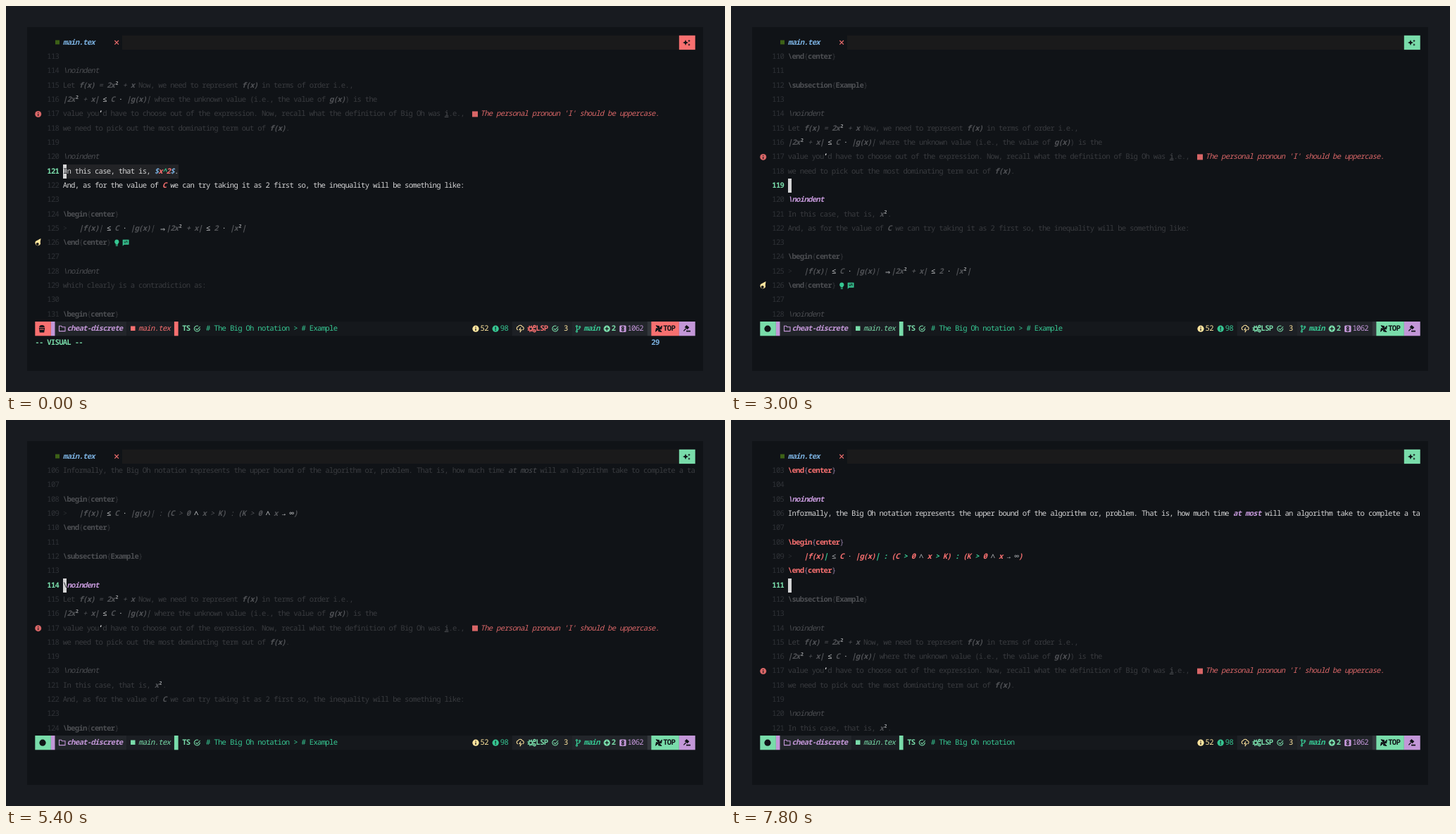
Animation, 1021 px wide and 548 px high, one loop 8000 ms. Source, as an HTML page:

```html
<!DOCTYPE html>
<html lang="en">
<head>
<meta charset="utf-8">
<title>Editor session</title>
<style>
  html, body { margin: 0; width: 100%; height: 100%; overflow: hidden; background: #181b20; }
  #stage { position: absolute; left: 0; top: 0; width: 1021px; height: 548px; overflow: hidden;
    --mode: #f87070; --tab: #f87070; }
  svg, #fixed, #rows { position: absolute; left: 0; top: 0; }
  #rows { width: 978.6px; height: 548px; overflow: hidden; }
  span, b { position: absolute; white-space: pre; font: 400 10.6px/20.31px "Noto Sans Mono", "DejaVu Sans Mono", monospace;
    letter-spacing: var(--gap); font-variant-ligatures: none; text-rendering: geometricPrecision; }
  b { height: 20.31px; }
  .line { fill: none; stroke-width: 1.1; }
</style>
</head>
<body>
<div id="stage">
  <svg width="1021" height="548" viewBox="0 0 1021 548">
    <rect x="30" y="30" width="960" height="488" fill="#101317"/>
    <!-- tab bar -->
    <rect x="165" y="41.8" width="791" height="20.3" fill="#1a1a1b"/>
    <rect x="955.8" y="41.8" width="22.9" height="20.3" fill="var(--tab)"/>
    <path d="M965 48l1.2 2.8 2.8 1.2-2.8 1.2L965 56l-1.2-2.8L961 52l2.8-1.2zM970 47.500l.6 1.400 1.400.6-1.400.6-.6 1.400-.6-1.400-1.400-.6 1.400-.6zM970 53l.6 1.400 1.400.6-1.400.6-.6 1.400-.6-1.400-1.400-.6 1.400-.6z" fill="#101317"/>
    <rect x="70" y="48.500" width="6" height="6" fill="#3d6117"/>
    <path class="line" d="M154.300 49l5.600 5.600m0-5.600l-5.600 5.600" stroke="#f87070"/>
    <!-- status bar -->
    <rect x="41.300" y="448" width="937.300" height="20.300" fill="#15181c"/>
    <rect x="69.500" y="448" width="101.600" height="20.300" fill="#22252a"/>
    <rect x="171.100" y="448" width="67.800" height="20.300" fill="#1b1e23"/>
    <rect x="718.700" y="448" width="84.700" height="20.300" fill="#1d2025"/>
    <rect x="803.400" y="448" width="107.200" height="20.300" fill="#22252a"/>
    <rect x="910.600" y="448" width="5.700" height="20.300" fill="#33373c"/>
    <g fill="var(--mode)">
      <rect x="41.300" y="448" width="22.600" height="20.300"/>
      <rect x="238.900" y="448" width="5.700" height="20.300"/>
      <rect x="916.300" y="448" width="39.600" height="20.300"/>
      <rect x="177" y="454.500" width="6.500" height="6.500"/>
    </g>
    <g fill="#c397d8">
      <rect x="63.900" y="448" width="5.600" height="20.300"/>
      <rect x="955.800" y="448" width="22.900" height="20.300"/>
      <rect x="871.200" y="453.500" width="9.400" height="9.400" rx="1.500"/>
    </g>
    <g id="bucket" fill="#101317">
      <path d="M46.800 456.800h8.400l-1 6.600h-6.400zM47.200 456a3.800 3 0 0 1 7.600 0z"/>
      <path class="line" d="M47.800 459h6" stroke="var(--mode)"/>
    </g>
    <circle id="dot" cx="52" cy="458.200" r="4.600" fill="#101317"/>
    <path class="line" d="M75.500 454.300h3l1.200 1.400h4.300v5.900h-8.500z" stroke="#c397d8"/>
    <g class="line" stroke="#79dcaa">
      <path id="check" d="M275.300 457.800a4 4 0 1 1-2.300-3.400M269.300 457.800l2 2 4.400-4.800"/>
      <use href="#check" x="508.500"/>
    </g>
    <circle cx="667" cy="458.200" r="4.600" fill="#ffe59e"/>
    <circle cx="695.200" cy="458.200" r="4.600" fill="#36c692"/>
    <circle cx="853.300" cy="458.200" r="4.600" fill="#79dcaa"/>
    <g class="line" stroke="#15181c" style="stroke-width:1.300">
      <path d="M667 455.400v1.400m0 .9v3.300M695.200 455.400v3.300m0 .9v1.400M850.700 458.200h5.200m-2.600-2.600v5.200"/>
      <circle cx="875.900" cy="456.500" r="1.400"/><circle cx="875.900" cy="460" r="1.400"/>
    </g>
    <path class="line" d="M727 460a2.600 2.600 0 0 1 .3-5 3.200 3.200 0 0 1 5.800.2 2.400 2.400 0 0 1 .4 4.700M731 456.500l-2 3.200h2.800l-2 3.400" stroke="#ffe59e"/>
    <g class="line" stroke="var(--mode)" style="stroke-width:1.500">
      <circle cx="745" cy="458.200" r="2.500"/>
      <circle cx="745" cy="458.200" r="3.900" stroke-dasharray="1.600 1.460"/>
      <circle cx="750.500" cy="455" r="1.500"/><circle cx="750.500" cy="461.200" r="1.500"/>
    </g>
    <g class="line" stroke="#36c692">
      <circle cx="810.500" cy="454.700" r="1.100"/><circle cx="814.700" cy="455.700" r="1.100"/><circle cx="810.500" cy="462" r="1.100"/>
      <path d="M810.500 455.800v5.100q0-1.900 2-2 2.200-.1 2.200-2.100"/>
    </g>
    <path d="M927 458.200l-4-4.400 4.600.8zM927 458.200l4.400-4-.8 4.600zM927 458.200l4 4.400-4.600-.8zM927 458.200l-4.400 4 .8-4.600z" fill="#101317" stroke="#101317"/>
    <path d="M966.300 453l4 3.200-2.600 3-4-3.200zM965 457.600l-3.200 3.400 1 .8 3.200-3.400zM966 460.800h6v1.600h-6z" fill="#101317"/>
    <!-- signs that travel with their lines, y = 0 at the line's centre -->
    <g id="sign117">
      <circle cx="45.700" r="4.500" fill="#d86667"/>
      <path class="line" d="M45.700-2.700v1.300m0 .9v3.200" stroke="#101317"/>
      <rect x="662" y="-4" width="8" height="8" fill="#d86667"/>
    </g>
    <g id="sign126">
      <path d="M49.500-6.300l-.8 5.300a3.700 3.700 0 1 1-4.800-2.200z" fill="#ffe59e"/>
      <circle cx="44.700" cy="1.700" r="2" fill="#101317"/>
      <path d="M157.300-4.700a3.200 3.200 0 0 1 1.700 5.900v1.200h-3.400v-1.200a3.200 3.200 0 0 1 1.700-5.900zM155.800 3.200h3v1.300h-3zM165.700-4.500h8.800v7h-6.800l-2 2z" fill="#36c692"/>
      <path class="line" d="M167.500-2.300h1m1 0h3.300m-5.300 2h3m1 0h1.300" stroke="#101317"/>
    </g>
  </svg>
  <div id="rows"></div>
  <div id="fixed"></div>
</div>
<script>
const CELL = 5.645, ROW = 20.31, LEFT = 41.3, TEXT = 7, LOOP = 8000;
const RED = '#f87070', GREEN = '#79dcaa', TEAL = '#36c692', BLUE = '#7ab0df',
  PURPLE = '#c397d8', YELLOW = '#ffe59e', FG = '#d4d4d5', BG = '#101317';
const $ = id => document.getElementById(id);
const stage = $('stage'), rows = $('rows');

// style key: [bright, dimmed, flags]; B bold, I italic, b bold only when bright, U underline
const STYLE = {
  n: [FG, '#393b3f', ''],
  m: [RED, '#505256', 'BI'],
  y: [YELLOW, '#505256', 'BI'],
  o: [TEAL, '#505256', 'bI'],
  s: ['#b4b6b9', '#c8cacc', ''],
  b: [BLUE, '#505256', 'BI'],
  p: [PURPLE, '#4c4e52', 'bI'],
  e: [RED, '#4c4e52', 'B'],
  d: ['#8e7aa0', '#34363a', ''],
  h: [TEAL, '#4c4e52', 'B'],
  l: [GREEN, '#4c4e52', 'B'],
  k: [YELLOW, '#34363a', ''],
  c: [TEAL, '#393b3f', ''],
  q: [FG, FG, 'B'],
  u: [FG, '#505256', 'U'],
  x: ['#d86667', '#d86667', 'I'],
  f: ['#2a2d31', '#2a2d31', '']
};

// "~k" switches to style k
const fn = f => `~m${f}~y(~mx~y)`;
const begin = '~e\\begin~d{~ecenter~d}', end = '~e\\end~d{~ecenter~d}', noindent = '~p\\noindent';
const was = mark => `value you~${mark}d have to choose out of the expression. Now, recall what the definition of Big Oh was ~ui~n.e.,  ~x  The personal pronoun 'I' should be uppercase.`;
const bound = '~f>   ~m|f(x)~o| ~s≤~m C ~s·~m |g(x)~o| ';
const LINES = {
  103: end, 105: noindent,
  106: 'Informally, the Big Oh notation represents the upper bound of the algorithm or, problem. That is, how much time ~pat most~n will an algorithm take to complete a ta',
  108: begin,
  109: bound + '~o: ~m(C ~o> ~m0 ~s∧~m x ~o> ~mK) ~o: ~m(K ~o> ~m0 ~s∧~m x ~s→~m ~s∞~m)',
  110: end,
  112: '~h\\subsection~k{~lExample~k}',
  114: noindent,
  115: `Let ${fn('f')} ~o= ~m2x~s² ~o+ ~mx~n Now, we need to represent ${fn('f')}~n in terms of order i.e.,`,
  116: `~m|2x~s² ~o+ ~mx| ~s≤~m C ~s·~m |${fn('g')}~o|~n where the unknown value ~c(~ni.e., the value of ${fn('g')}~c)~n is the`,
  117: was('q’~n'),
  118: `we need to pick out the most dominating term out of ${fn('f')}~n.`,
  120: noindent,
  121: 'In this case, that is, ~mx~s²~n.',
  122: 'And, as for the value of ~mC~n we can try taking it as 2 first so, the inequality will be something like:',
  124: begin,
  125: bound + '~s⇒~m |2x~s²~m + x| ~s≤~m 2 ~s·~m |x~s²~m|',
  126: end, 128: noindent,
  129: 'which clearly is a contradiction as:',
  131: begin
};
// what a line shows while it holds the cursor or is selected
const OPEN = {
  115: `Let ~y$${fn('f')} ~o= ~m2x^2 ~o+ ~mx~y$~n Now, we need to represent ~y$${fn('f')}~y$~n in terms of order i.e.,`,
  116: `~o$~m|2x^2 ~o+ ~mx| ~p\\leq ~mC ~p\\cdot ~m|${fn('g')}~o|$~n where the unknown value ~c(~ni.e., the value of ~y$${fn('g')}~y$~c)~n is the`,
  117: was("n'"),
  118: `we need to pick out the most dominating term out of ~y$${fn('f')}~y$~n.`,
  121: 'In this case, that is, ~b$~mx~o^~m2~b$~n.'
};
// cursor line: first and last lit line
const LIT = { 111: [103, 110], 112: [112, 124], 113: [114, 114], 114: [114, 114], 115: [115, 116], 116: [116, 117],
  117: [116, 117], 118: [118, 121], 119: [120, 120], 120: [120, 120], 121: [121, 122] };

// start ms, top line, cursor line, selection count
const STEPS = [
  [0, 113, 121, 29], [1000, 113, 121, 2], [1100, 113, 120, 2], [1400, 113, 119, 3],
  [1600, 113, 119, 4], [1700, 113, 118, 4], [1900, 113, 117, 5], [2300, 113, 117], [2400, 113, 117],
  [3000, 110, 119], [3500, 110, 120], [3900, 110, 119], [4200, 110, 118],
  [4500, 109, 117], [4900, 108, 116], [5100, 107, 115], [5400, 106, 114], [5700, 105, 113],
  [5900, 104, 112], [6500, 103, 111], [6900, 103, 112], [7300, 103, 113], [7600, 103, 112], [7800, 103, 111]
];

function put(box, col, row, text, color, flags = '') {
  const el = document.createElement('span');
  el.textContent = text;
  el.style.cssText = `left:${LEFT + col * CELL}px;top:${41.8 + row * ROW}px;color:${color}`;
  if (/B/.test(flags)) el.style.fontWeight = 700;
  if (/I/.test(flags)) el.style.fontStyle = 'italic';
  if (/U/.test(flags)) el.style.textDecoration = 'underline';
  box.append(el);
  return el;
}

function block(col, row, cells, color) {
  const el = document.createElement('b');
  el.style.cssText = `left:${LEFT + col * CELL}px;top:${41.8 + row * ROW}px;width:${cells * CELL}px;background:${color}`;
  rows.append(el);
}

const plain = line => line.replace(/~\w/g, '');

function drawLine(line, row, lit, picked) {
  let col = TEXT, key = 'n';
  line.split(/(~\w)/).forEach(part => {
    if (/^~\w$/.test(part)) { key = part[1]; return; }
    if (!part) return;
    const [bright, dim, flags] = STYLE[key];
    const on = lit || (picked && key !== 'n');
    const color = picked && key === 'p' ? RED : on ? bright : dim;
    put(rows, col, row, part, color, on ? flags.replace('b', 'B') : flags);
    col += part.length;
  });
}

function moveSign(id, row) {
  const el = $(id);
  el.style.display = row >= 1 && row <= 19 ? '' : 'none';
  el.setAttribute('transform', `translate(0 ${51.95 + row * ROW})`);
}

function show([time, top, cursor, count]) {
  rows.textContent = '';
  const [first, last] = LIT[cursor];
  for (let row = 1; row <= 19; row++) {
    const num = top + row - 1, here = num === cursor;
    const picked = count && num >= cursor && num <= 121;
    const line = (here || picked) && OPEN[num] || LINES[num] || '';
    const length = plain(line.split('  ~x')[0]).length;
    if (picked && length) block(TEXT, row, length, '#222326');
    put(rows, 3, row, num, here ? GREEN : '#2f3237', here ? 'B' : '');
    drawLine(line, row, num >= first && num <= last, picked);
    if (here) {
      block(TEXT, row, 1, FG);
      put(rows, TEXT, row, plain(line)[0] || ' ', BG);
    }
  }
  moveSign('sign117', 118 - top);
  moveSign('sign126', 127 - top);
  const visual = time < 2400;
  stage.style.setProperty('--mode', visual ? RED : GREEN);
  stage.style.setProperty('--tab', time < 3000 ? RED : GREEN);
  $('bucket').style.display = visual ? '' : 'none';
  $('dot').style.display = visual ? 'none' : '';
  example.hidden = cursor === 111;
  command.textContent = count ? '-- VISUAL --' : '';
  tally.textContent = count || '';
}

// letter spacing that puts the monospace font on the cell grid
const pen = document.createElement('canvas').getContext('2d');
pen.font = '100px "Noto Sans Mono", "DejaVu Sans Mono", monospace';
stage.style.setProperty('--gap', CELL - pen.measureText('n').width * 0.106 + 'px');

[
  [7, 0, 'main.tex', BLUE, 'BI'],
  [8, 20, 'cheat-discrete', PURPLE, 'BI'],
  [26, 20, 'main.tex', 'var(--mode)', 'I'],
  [37, 20, 'TS', GREEN, 'B'],
  [43, 20, '# The Big Oh notation', TEAL],
  [112, 20, '52', YELLOW],
  [117, 20, '98', TEAL],
  [126, 20, 'LSP', 'var(--mode)', 'B'],
  [133, 20, '3', YELLOW],
  [138, 20, 'main', TEAL, 'BI'],
  [145, 20, '2', GREEN, 'B'],
  [149, 20, '1062', PURPLE],
  [158, 20, 'TOP', BG, 'B']
].forEach(item => put($('fixed'), ...item));
const example = put($('fixed'), 65, 20, '> # Example', TEAL);
const command = put($('fixed'), 0, 21, '', GREEN, 'B');
const tally = put($('fixed'), 155, 21, '', BLUE, 'B');

let current;
function tick() {
  const now = performance.now() % LOOP;
  const step = STEPS.findLast(s => s[0] <= now);
  if (step !== current) show(current = step);
  requestAnimationFrame(tick);
}
tick();
</script>
</body>
</html>
```
